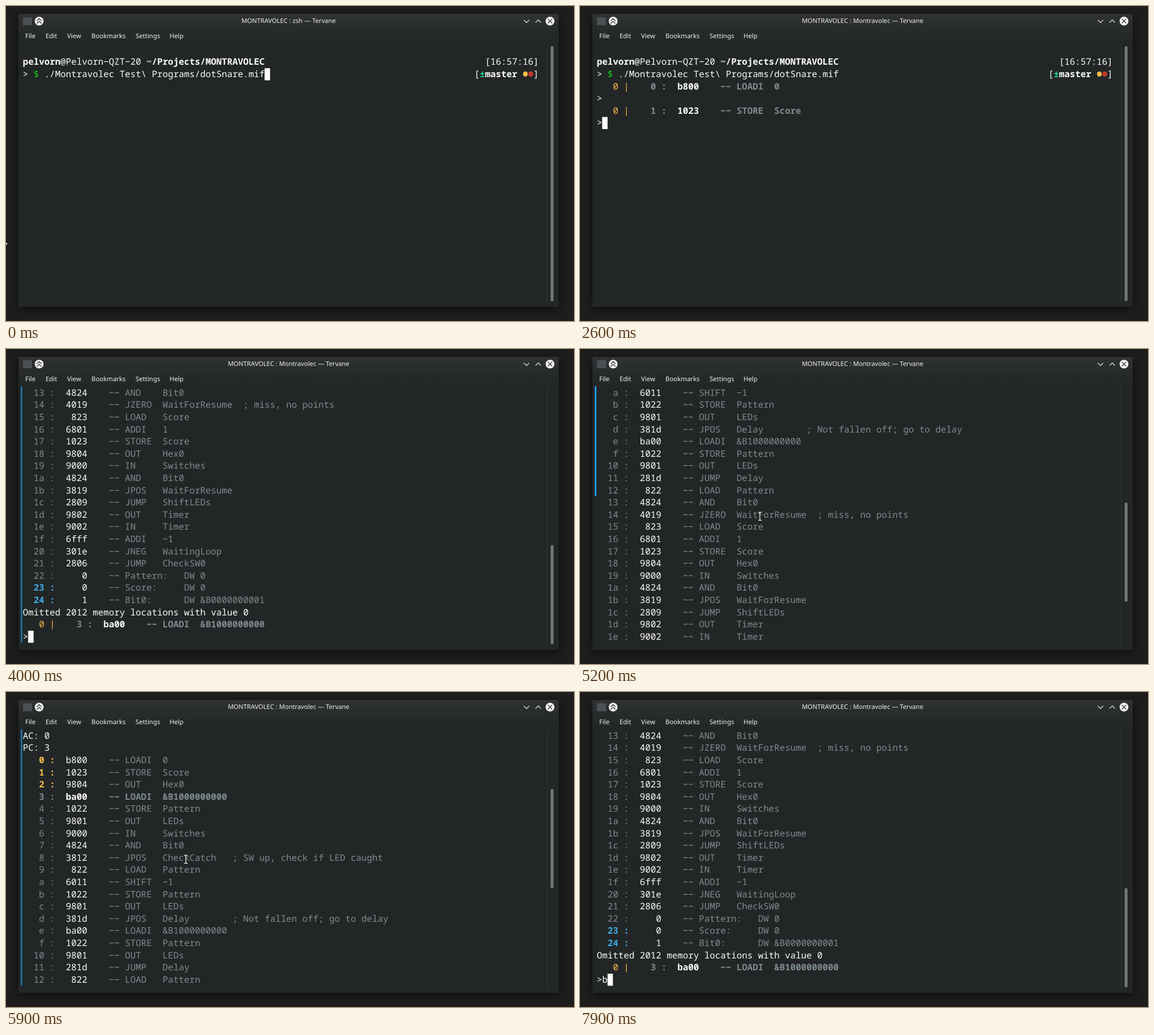
Recreate the animation shown at these times as an HTML page. Size 1004 by 558 pixels, loop 8 s.

```html
<!DOCTYPE html>
<html lang="en">
<head>
<meta charset="utf-8">
<title>Terminal session</title>
<style>
  html, body { margin: 0; width: 100%; height: 100%; overflow: hidden; background: #1e1e1e; }
  #stage { position: relative; width: 1004px; height: 558px; overflow: hidden; background: #1e1e1e; }
  #stage div, #stage span, #stage svg { position: absolute; }
  #win {
    left: 22px; top: 14px; width: 955px; height: 519px; border-radius: 3px 3px 0 0;
    background: linear-gradient(#303233, #282b2c 26px, #232627 52px);
    box-shadow: 0 4px 18px rgba(0, 0, 0, .6);
  }
  .ui { font: 11.4px/20px "Noto Sans", sans-serif; color: #eff0f1; white-space: pre; text-rendering: geometricPrecision; }
  .ui span { top: 44px; }
  #title { left: 200px; width: 599px; top: 17px; text-align: center; font-size: 11.2px; }
  #rule { left: 955.5px; top: 66px; width: 1px; height: 463px; background: #303436; }
  #bar { left: 26px; width: 3px; }
  .line, #typed {
    left: 29.8px; height: 21.6px; white-space: pre; color: #fcfcfc;
    font: 500 15.8333px/21.6px "Noto Sans Mono", monospace; text-rendering: geometricPrecision;
  }
  .b { font-weight: 700; }
  .g { color: #7f8c8d; }
  .o { color: #fdbc4b; }
  .u { color: #3daee9; }
  .s { color: #11d116; }
  .t { color: #1cdc9a; }
  .dot { width: 8.6px; height: 8.6px; top: 6.5px; margin-left: .6px; border-radius: 50%; }
  #cursor { fill: #fcfcfc; stroke: #fcfcfc; }
  .idle #cursor { fill: none; }
  .idle #title { color: #96999b; }
  .idle #buttons { opacity: .65; }
</style>
</head>
<body>
<div id="stage">
  <div id="win"></div>
  <div id="title" class="ui"></div>
  <div id="menu" class="ui" style="left:0;top:0">
    <span style="left:34px">File</span><span style="left:70px">Edit</span><span style="left:108px">View</span>
    <span style="left:151px">Bookmarks</span><span style="left:229px">Settings</span><span style="left:289px">Help</span>
  </div>
  <div id="rule"></div>
  <div id="text" style="left:0;top:0"></div>
  <div id="typed"></div>
  <div id="bar"></div>
  <svg width="1004" height="558" style="left:0;top:0" fill="none">
    <rect x="30" y="20" width="16" height="14" fill="#4d5052"/>
    <g id="buttons" stroke-width="1.2">
      <g fill="#eff0f1"><circle cx="58.6" cy="26.7" r="7.8"/><circle cx="961.6" cy="26.7" r="7.8"/></g>
      <path stroke="#2b2e30" d="M54.5 26.3l4.1-4 4.1 4M54.5 31l4.1-4 4.1 4M957.8 22.9l7.6 7.6m0-7.6l-7.6 7.6"/>
      <path stroke="#eff0f1" d="M915.3 24.6l4.8 4.8 4.8-4.8M936 29.4l4.8-4.8 4.8 4.8"/>
    </g>
    <rect id="thumb" x="962.7" width="5.1" rx="2.5" fill="#747677"/>
    <rect id="cursor" width="8.5" height="20.4"/>
    <path id="edge" fill="#fcfcfc" d="M0 418.8l2.6 2.4-2.6 2.4z"/>
    <g id="pointer">
      <path stroke="#111" stroke-width="3" d="M-3-7h2l1 1 1-1h2M0-6v12M-3 7h2l1-1 1 1h2"/>
      <path stroke="#fcfcfc" stroke-width="1.3" d="M-3-7h2l1 1 1-1h2M0-6v12M-3 7h2l1-1 1 1h2"/>
    </g>
  </svg>
</div>
<script>
const LOOP = 8000, ROWS = 21, ROW_H = 21.6, COL_W = 9.5, LEFT = 29.8, TOP = 66.7;
const $ = id => document.getElementById(id);

const program = `b800 LOADI  0
1023 STORE  Score
9804 OUT    Hex0
ba00 LOADI  &B1000000000
1022 STORE  Pattern
9801 OUT    LEDs
9000 IN     Switches
4824 AND    Bit0
3812 JPOS   CheckCatch   ; SW up, check if LED caught
822 LOAD   Pattern
6011 SHIFT  -1
1022 STORE  Pattern
9801 OUT    LEDs
381d JPOS   Delay        ; Not fallen off; go to delay
ba00 LOADI  &B1000000000
1022 STORE  Pattern
9801 OUT    LEDs
281d JUMP   Delay
822 LOAD   Pattern
4824 AND    Bit0
4019 JZERO  WaitForResume  ; miss, no points
823 LOAD   Score
6801 ADDI   1
1023 STORE  Score
9804 OUT    Hex0
9000 IN     Switches
4824 AND    Bit0
3819 JPOS   WaitForResume
2809 JUMP   ShiftLEDs
9802 OUT    Timer
9002 IN     Timer
6fff ADDI   -1
301e JNEG   WaitingLoop
2806 JUMP   CheckSW0
0 Pattern:   DW 0
0 Score:     DW 0
1 Bit0:      DW &B0000000001`.split("\n").map(s => {
  const gap = s.indexOf(" ");
  return { value: s.slice(0, gap).padStart(4), code: "-- " + s.slice(gap + 1) };
});

// A line is a list of [column, text, classes, fill].
const plain = s => [[0, s]];
const step = n => [
  [3, "0 |", "o"], [10, n + " :", "g b"],
  [15, program[n].value, "b"], [23, program[n].code, "g b"]
];
const word = ({ value, code }, n) => {
  const now = n === 3 ? " b" : "";
  const mark = n < 3 ? "o b" : n > 34 ? "u b" : "g" + now;
  return [[2, n.toString(16).padStart(2) + " :", mark], [8, value, now], [16, code, "g" + now]];
};

const lines = [
  [],
  [[0, "pelvorn", "b"], [7, "@Pelvorn-QZT-20"], [23, "~/Projects/MONTRAVOLEC", "b"], [86, "[16:57:16]"]],
  [[0, ">"], [2, "$", "s"], [4, "./Montravolec Test\\ Programs/dotSnare.mif"],
   [84, "["], [85, "±", "t b"], [86, "master", "b"],
   [93, "", "dot", "#fdbc4b"], [94, "", "dot", "#c0392b"], [95, "]"]],
  step(0), plain(">"), step(1), plain(">"), step(2), plain(">"),
  plain("Hex0: 0000"), step(3), plain(">"),
  plain("AC: 0"), plain("PC: 3"),
  ...program.map(word),
  plain("Omitted 2012 memory locations with value 0"),
  step(3), plain(">")
];

const rowsEl = lines.map(parts => {
  const row = document.createElement("div");
  row.className = "line";
  for (const [col, text, cls = "", fill] of parts) {
    const span = document.createElement("span");
    span.className = cls;
    span.textContent = text.replace(/-/g, "\u2212");
    span.style.left = col * COL_W + "px";
    if (fill) span.style.background = fill;
    row.append(span);
  }
  return $("text").appendChild(row);
});

const BRIGHT = "#1d99f3", DIM = "#1f6ba1";
const cues = [
  [0, { top: 0, end: 3, col: 45, typed: "", app: "zsh", focus: true, edge: true, ptr: null, bar: [0, 0], tint: BRIGHT }],
  [100, { edge: false }],
  [300, { focus: false }],
  [1100, { ptr: [60, 372] }],
  [1200, { ptr: [128, 390] }],
  [1300, { ptr: [190, 401], focus: true }],
  [1400, { ptr: [211, 400] }],
  [1800, { end: 5, col: 1, ptr: null }],
  [2300, { app: "Montravolec" }],
  [2600, { end: 7 }],
  [3100, { end: 9 }],
  [3400, { end: 12 }],
  [3600, { typed: "d" }],
  [3700, { typed: "", end: 54, top: 33, bar: [0, 21] }],
  [4000, { tint: DIM }],
  [4700, { ptr: [211, 355.5] }],
  [4900, { ptr: [318, 296.5] }],
  [5200, { top: 24, bar: [0, 9], tint: BRIGHT }],
  [5300, { top: 21, bar: [0, 12] }],
  [5600, { top: 15, bar: [0, 18] }],
  [5700, { top: 12, bar: [0, 21] }],
  [5900, { tint: DIM }],
  [7500, { top: 31, bar: [2, 21], tint: BRIGHT }],
  [7600, { top: 32, bar: [1, 21] }],
  [7700, { top: 33, bar: [0, 21] }],
  [7900, { typed: "b", bar: [0, 0], ptr: null }]
];

const px = (el, props) => { for (const k in props) el.style[k] = props[k] + "px"; };
const attr = (el, props) => { for (const k in props) el.setAttribute(k, props[k]); };
const show = (el, on) => { el.style.display = on ? "" : "none"; };

function render(s) {
  const rowTop = i => TOP + (i - s.top) * ROW_H;
  rowsEl.forEach((el, i) => {
    show(el, i < s.end && i >= s.top && i < s.top + ROWS);
    px(el, { top: rowTop(i) });
  });

  const last = s.end - 1, inView = last < s.top + ROWS;
  show($("cursor"), inView);
  show($("typed"), inView);
  $("typed").textContent = s.typed;
  px($("typed"), { top: rowTop(last), left: LEFT + COL_W });
  attr($("cursor"), { x: LEFT + (s.col + s.typed.length) * COL_W + .4, y: rowTop(last) + .8 });

  const total = Math.max(ROWS, s.end);
  attr($("thumb"), { y: 71 + 452 * s.top / total, height: 452 * ROWS / total });

  const [from, to] = s.bar;
  px($("bar"), { top: 66 + from * ROW_H, height: (to - from) * ROW_H });
  $("bar").style.background = s.tint;

  $("title").textContent = `MONTRAVOLEC : ${s.app} — Tervane`;
  $("stage").classList.toggle("idle", !s.focus);
  show($("edge"), s.edge);
  show($("pointer"), s.ptr);
  if (s.ptr) attr($("pointer"), { transform: `translate(${s.ptr})` });
}

let shown = -1;
function tick() {
  const t = performance.now() % LOOP;
  const n = cues.filter(([at]) => at <= t).length;
  if (n !== shown) {
    shown = n;
    render(Object.assign({}, ...cues.slice(0, n).map(c => c[1])));
  }
  requestAnimationFrame(tick);
}
tick();
</script>
</body>
</html>
```
